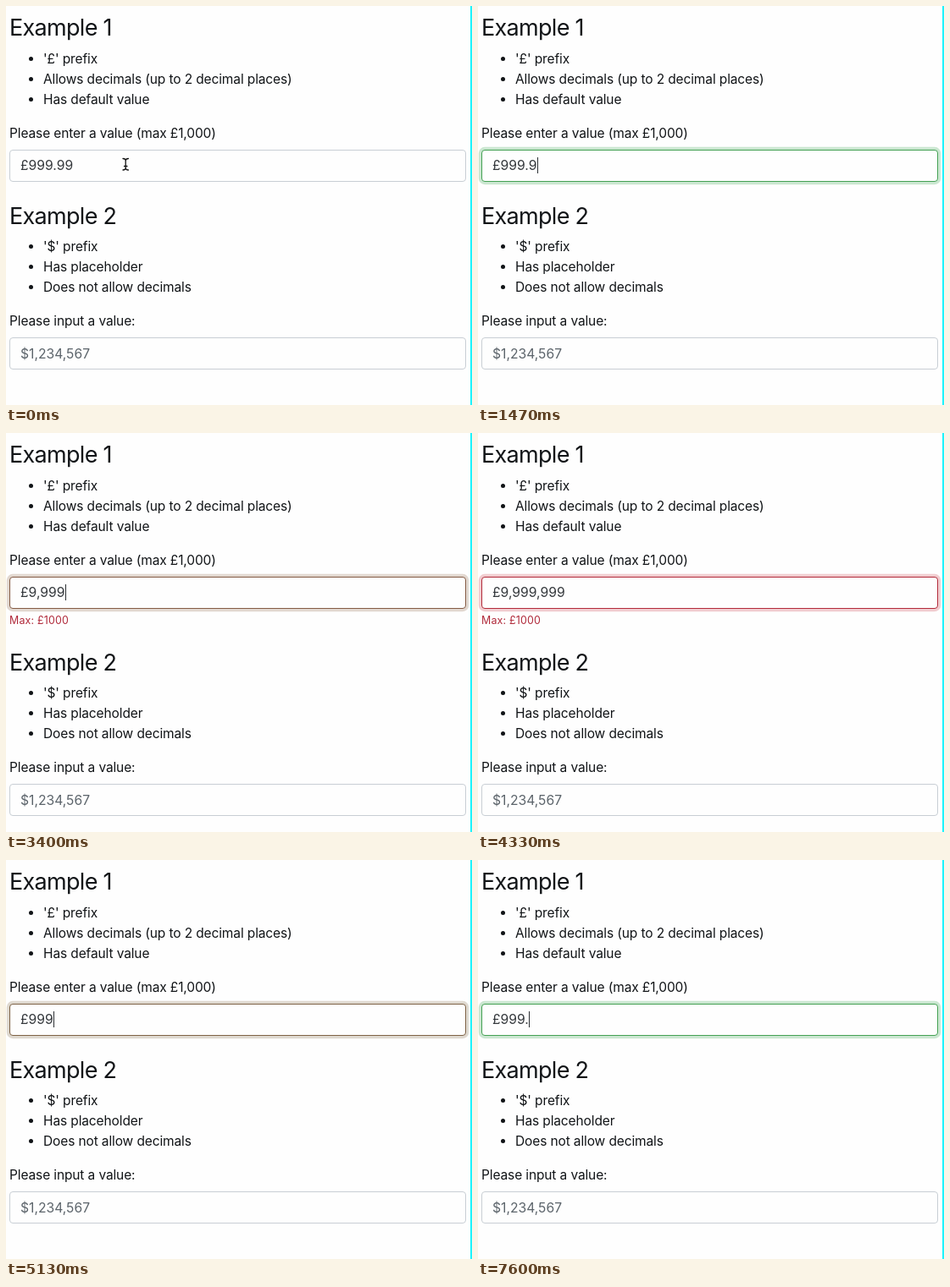
These frames come from a looping animation (550 by 472 pixels, 8000 ms). An HTML page:

```html
<!DOCTYPE html>
<html lang="en">
<head>
<meta charset="utf-8">
<title>Currency input</title>
<style>
  * { box-sizing: border-box; }
  html, body { margin: 0; width: 100%; height: 100%; overflow: hidden; background: #fefefe; }
  #stage {
    position: relative; width: 550px; height: 472px; overflow: hidden;
    padding: 8px 7px 0 4px; background: #fefefe; color: #111417;
    font: 15.5px/24px Inter, Roboto, sans-serif;
    letter-spacing: -0.12px; font-optical-sizing: none; white-space: nowrap;
  }
  #stage::after {
    content: ""; position: absolute; top: 0; right: 0; width: 2px; height: 100%; background: #1df3fb;
  }
  h3, ul, label, .field span { position: relative; top: 1px; }
  h3 {
    top: 1.4px; margin: 0 0 8px;
    font-size: 27px; font-weight: 400; line-height: 33.6px; letter-spacing: -0.7px;
  }
  ul { margin: 0 0 16px; padding-left: 40px; }
  label { display: block; margin-bottom: 8px; }
  .field {
    display: flex; align-items: center; width: 539px; height: 38px; padding: 0 12px;
    border: 1px solid #c8ced4; border-radius: 4px; background: #fefefe;
    color: #34383c; font-size: 15.7px; letter-spacing: 0;
  }
  .field span { top: 0.5px; }
  .hint { color: #5c646b; }
  #caret { width: 1px; height: 19px; background: #2b2f33; }
  #error {
    margin-top: 4px; color: #b0293a; font-size: 12.4px; line-height: 19.2px; letter-spacing: 0.2px;
  }
  section + section { margin-top: 23px; }
  #mouse { position: absolute; left: 135px; top: 179px; }
</style>
</head>
<body>
<div id="stage">
  <section>
    <h3>Example 1</h3>
    <ul>
      <li>'£' prefix</li>
      <li>Allows decimals (up to 2 decimal places)</li>
      <li>Has default value</li>
    </ul>
    <label>Please enter a value (max £1,000)</label>
    <div class="field" id="input"><span id="value">£999.99</span><i id="caret"></i></div>
    <div id="error">Max: £1000</div>
  </section>
  <section>
    <h3>Example 2</h3>
    <ul>
      <li>'$' prefix</li>
      <li>Has placeholder</li>
      <li>Does not allow decimals</li>
    </ul>
    <label>Please input a value:</label>
    <div class="field hint"><span>$1,234,567</span></div>
  </section>
  <svg id="mouse" width="13" height="17" fill="none" stroke-linecap="round">
    <defs><path id="beam" d="M3 1.5Q6.2 1.5 6.2 4Q6.2 1.5 9.4 1.5M6.2 4V12.5M3 15Q6.2 15 6.2 12.5Q6.2 15 9.4 15M4.5 10.5H8"/></defs>
    <use href="#beam" stroke="#fff" stroke-width="2.8"/>
    <use href="#beam" stroke="#111" stroke-width="1.3"/>
  </svg>
</div>
<script>
const LOOP = 8000, FADE = 150;
const $ = id => document.getElementById(id);
const input = $('input'), value = $('value'), caret = $('caret'), error = $('error'), mouse = $('mouse');

// [time, typed amount]
const edits = [
  [0, '999.99'], [1330, '999.9'], [1530, '999.'], [1730, '999'], [1930, '99'],
  [3200, '999'], [3330, '9,999'], [3530, '99,999'], [3670, '999,999'], [3870, '9,999,999'],
  [4600, '999,999'], [4800, '99,999'], [4970, '9,999'], [5070, '999'], [5270, '99'], [5470, '9'],
  [7000, '99'], [7130, '999'], [7600, '999.']
];

// [time, caret shown]
const blinks = [
  [0, 0], [200, 1], [670, 0], [1130, 1], [2670, 0], [3130, 1],
  [4330, 0], [4600, 1], [6000, 0], [6130, 1], [6600, 0], [7000, 1]
];

// border rgb, ring rgb, ring strength
const idle = [200, 206, 212, 0, 123, 255, 0];
const focus = [139, 188, 250, 0, 123, 255, 1];
const valid = [67, 160, 82, 50, 160, 72, 1];
const invalid = [178, 42, 58, 200, 56, 68, 1];
const looks = [[0, idle], [130, focus], [1330, valid], [3330, invalid], [5070, valid]];

const indexAt = (list, t) => list.findLastIndex(e => e[0] <= t);
const at = (list, t) => list[indexAt(list, t)][1];
const ease = p => p * p * (3 - 2 * p) * (1 - p) + (1 - (1 - p) ** 2) * p;

function paintField(t) {
  const i = indexAt(looks, t);
  const [start, to] = looks[i];
  const from = i ? looks[i - 1][1] : to;
  const k = ease(Math.min(1, (t - start) / FADE));
  const c = to.map((v, n) => from[n] + (v - from[n]) * k);
  input.style.borderColor = `rgb(${c.slice(0, 3)})`;
  input.style.boxShadow = `0 0 0 ${3.2 * c[6]}px rgba(${c.slice(3, 6)},${0.25 * c[6]})`;
  error.style.display = to === invalid ? 'block' : 'none';
}

function render(now) {
  const t = now % LOOP;
  value.textContent = '£' + at(edits, t);
  caret.style.visibility = at(blinks, t) ? 'visible' : 'hidden';
  mouse.style.visibility = t < 1330 ? 'visible' : 'hidden';
  paintField(t);
}

const origin = performance.now();
function tick() {
  render(performance.now() - origin);
  requestAnimationFrame(tick);
}
tick();
</script>
</body>
</html>
```
